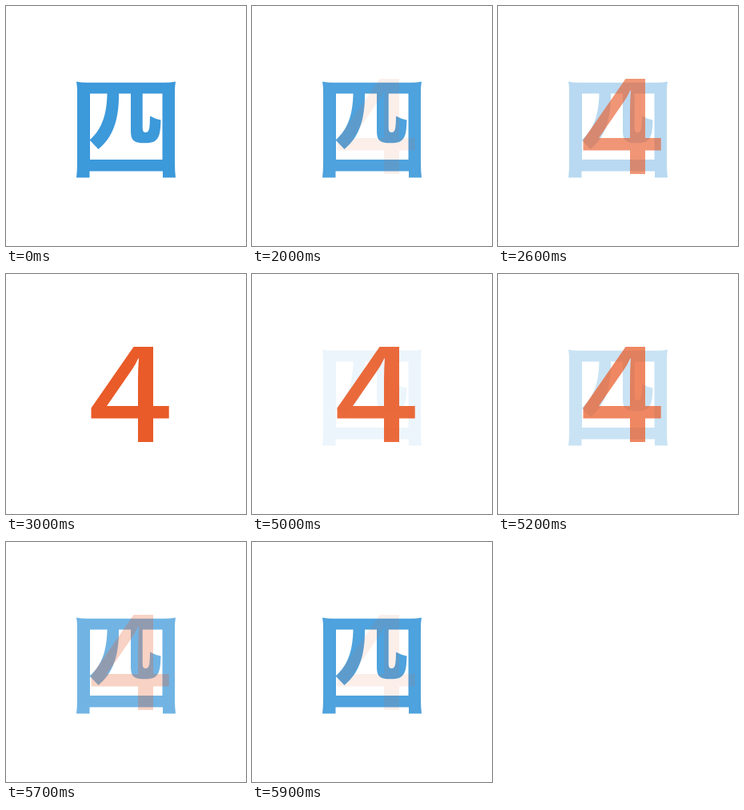
Animation of 300x300 px, one loop 6000 ms. Source, as an HTML page without scripts:

```html
<!DOCTYPE html>
<html lang="zh">
<head>
<meta charset="utf-8">
<title>四 / 4</title>
<style>
  html, body { margin: 0; width: 100%; height: 100%; overflow: hidden; background: #fff; }
  svg { display: block; width: 100%; height: 100%; }

  /* Crossfade in elevenths, one step every 100 ms */
  .hanzi { fill: #3c99da; animation: hanzi 6s infinite; }
  .digit { fill: #e95b28; animation: digit 6s infinite; }

  @keyframes hanzi {
    0%       { opacity: 1; animation-timing-function: step-end; }
    33.3333% { opacity: .9091; animation-timing-function: steps(10, end); }
    50%      { opacity: 0; animation-timing-function: step-end; }
    83.3333% { opacity: .0909; animation-timing-function: steps(10, end); }
    100%     { opacity: 1; }
  }
  @keyframes digit {
    0%       { opacity: 0; animation-timing-function: step-end; }
    33.3333% { opacity: .0909; animation-timing-function: steps(10, end); }
    50%      { opacity: 1; animation-timing-function: step-end; }
    83.3333% { opacity: .9091; animation-timing-function: steps(10, end); }
    100%     { opacity: 0; }
  }
</style>
</head>
<body>
<svg viewBox="0 0 300 300" role="img" aria-label="四 4">
  <g class="hanzi">
    <!-- box with flared corners and feet -->
    <path fill-rule="evenodd" d="M88 94.5Q94 95.7 102 95.7H198Q206 95.7 212 94.5Q211 100 211 108V196Q211 206 212 214.5H196V206.5H104.5V214.5H88Q89 206 89 196V108Q89 100 88 94.5Z
      M105 109.5V192H195.5V109.5Z"/>
    <!-- inner strokes -->
    <path d="M126.5 109H141V115C140.5 142 134 164 115.500 179L104.500 167.500C120 154 126 136 126.500 109Z"/>
    <path d="M156 109H170.700V151C170.700 156 171.500 158 174.500 158C179 158 179.800 154 180 137.500Q186 141 193.500 142.500C193 165 190 171.300 174 171.300C159 171.300 156 168 156 155Z"/>
  </g>
  <path class="digit" fill-rule="evenodd" d="M159.500 91H184V165H203.700V180.500H184V210H165V180.500H106.500V167.500Z
    M126 165H165V132Q165 118 166 105.500H165.300Q162 113 157.500 119.500Z"/>
</svg>
</body>
</html>
```
